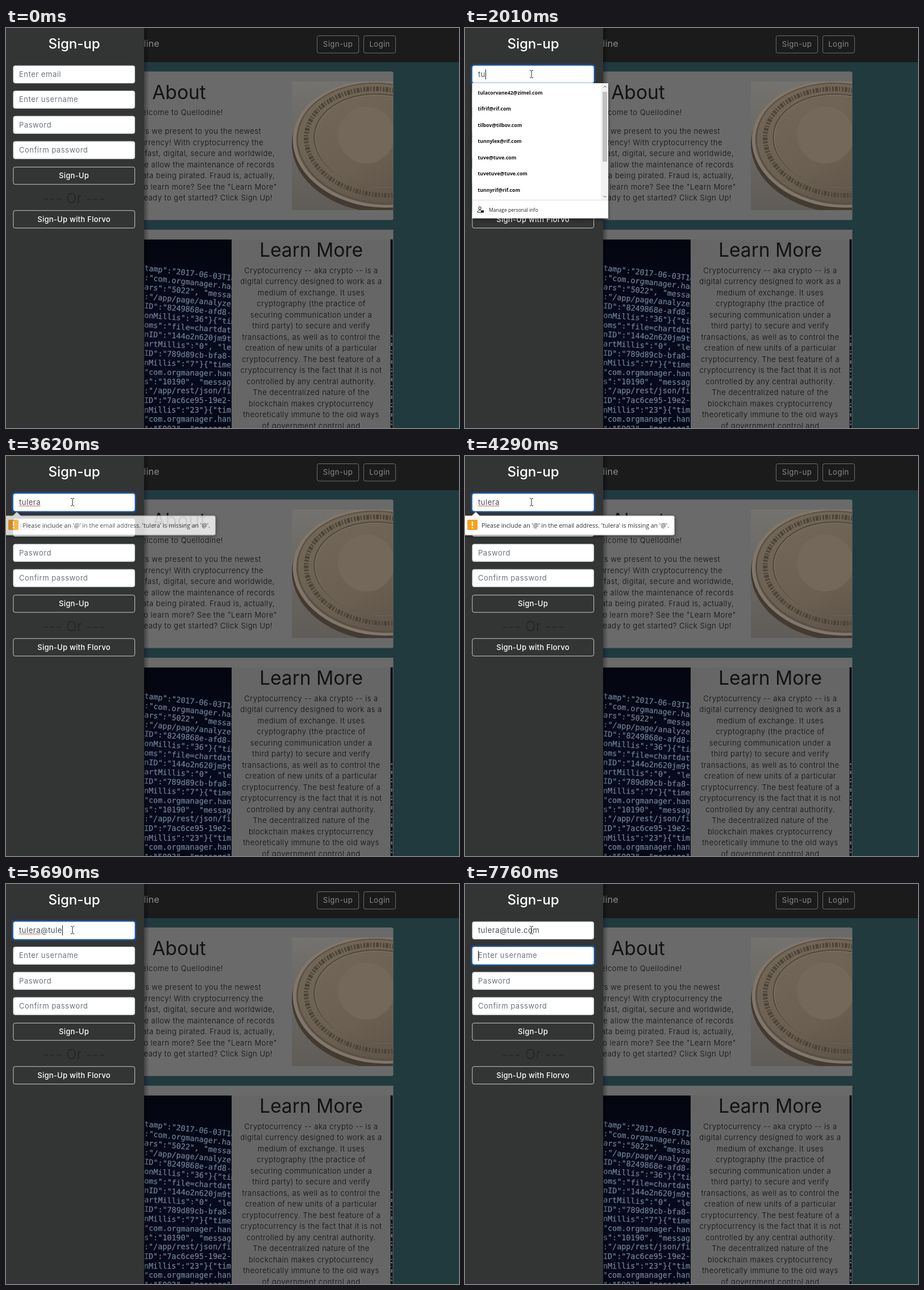
An HTML page that plays this animation: 797x703 px, repeating every 8 s.

```html
<!DOCTYPE html>
<html lang="en">
<head>
<meta charset="utf-8">
<title>Sign-up form</title>
<style>
  html, body { margin: 0; width: 100%; height: 100%; overflow: hidden; background: #203a3e; }
  svg { display: block; width: 100%; height: 100%; }
  text { font: 400 13px Inter, "Open Sans", sans-serif; letter-spacing: .04em; }
  .mid { text-anchor: middle; }
  .end { text-anchor: end; }
  .light { font-weight: 300; fill: #0c0e10; }
  .h1 { font-size: 33.5px; letter-spacing: 0; fill: #111315; }
  .title { font-size: 24px; letter-spacing: 0; font-weight: 500; fill: #fff; }
  .or { font-size: 24px; letter-spacing: .02em; font-weight: 300; fill: #212529; }
  .brand { font-size: 16.25px; letter-spacing: .01em; fill: #8b8b8b; }
  .nav { fill: #8a8a8a; }
  .btn { font-weight: 500; fill: #fff; letter-spacing: .02em; }
  .hint { fill: #6c757d; }
  .typed { fill: #495057; }
  .ui text { font-family: "Open Sans", "Noto Sans", sans-serif; letter-spacing: 0; }
  .ui .tip { font-size: 7.4px; fill: #555; }
  .ui .item { font-size: 8.7px; font-weight: 700; fill: #111; }
  .ui .foot { font-size: 8.5px; fill: #222; }
  .ui .msg { font-size: 10.6px; fill: #333; }
  .code text {
    font: 400 13.4px "DejaVu Sans Mono", "Noto Sans Mono", monospace; letter-spacing: 0;
    fill: #6d8096; stroke: #6d8096; stroke-width: .25;
  }
</style>
</head>
<body>
<svg viewBox="0 0 797 703" preserveAspectRatio="none">
  <defs>
    <clipPath id="coinBox"><rect x="503" y="94" width="178" height="226"/></clipPath>
    <clipPath id="codeBox"><rect x="243" y="371.5" width="154" height="332"/></clipPath>
    <linearGradient id="backdrop" x2="0" y2="1">
      <stop offset="0" stop-color="#74726e"/><stop offset="1" stop-color="#605c57"/>
    </linearGradient>
    <linearGradient id="metal" x2="1" y2="1">
      <stop offset="0" stop-color="#746959"/><stop offset=".55" stop-color="#6a5f51"/><stop offset="1" stop-color="#564c41"/>
    </linearGradient>
    <linearGradient id="navy" x2="0" y2="1">
      <stop offset="0" stop-color="#03050f"/><stop offset=".5" stop-color="#070b1e"/><stop offset="1" stop-color="#050817"/>
    </linearGradient>
    <linearGradient id="edge">
      <stop offset="0" stop-opacity=".35"/><stop offset="1" stop-opacity="0"/>
    </linearGradient>
    <filter id="shadow" x="-10%" y="-10%" width="120%" height="125%">
      <feDropShadow dx="0" dy="2" stdDeviation="3.5" flood-opacity=".45"/>
    </filter>
  </defs>

  <!-- dimmed page -->
  <rect width="797" height="703" fill="#203a3e"/>
  <rect x="243" y="60" width="7" height="643" fill="#253a4b"/>
  <rect width="797" height="60" fill="#1b1b1b"/>
  <text class="brand end" x="270" y="33">Quellodine</text>
  <g fill="none" stroke="#858585" stroke-width=".8">
    <rect x="547.4" y="13.6" width="73.2" height="30.4" rx="3"/>
    <rect x="629.4" y="13.6" width="56" height="30.4" rx="3"/>
  </g>
  <text class="nav mid" x="584" y="33">Sign-up</text>
  <text class="nav mid" x="657.5" y="33">Login</text>

  <rect x="200" y="76.5" width="481.5" height="261" rx="3" fill="#6a6a6a"/>
  <text class="h1 mid" x="304.5" y="124.5">About</text>
  <g id="about"></g>
  <g clip-path="url(#coinBox)">
    <rect x="503" y="94" width="178" height="226" fill="url(#backdrop)"/>
    <g transform="rotate(6 655 207)">
      <ellipse cx="655" cy="211" rx="152" ry="113" fill="#433a31"/>
      <ellipse cx="657" cy="204" rx="153" ry="111" fill="#81766a"/>
      <ellipse cx="659" cy="203" rx="149" ry="107" fill="#5a5045"/>
      <ellipse cx="659" cy="202" rx="146" ry="104" fill="url(#metal)"/>
      <g fill="none">
        <ellipse cx="659" cy="200" rx="132" ry="93" stroke="#4d443a" stroke-width="8" stroke-dasharray="3 2 5 2 2 3"/>
        <ellipse cx="659" cy="198" rx="118" ry="82" stroke="#4a4137" stroke-width="1.5"/>
        <ellipse cx="659" cy="199" rx="116" ry="81" stroke="#7d7163"/>
      </g>
    </g>
    <circle cx="634" cy="188" r="50" fill="#736859"/>
  </g>

  <rect x="200" y="354.5" width="481.5" height="360" fill="#6a6a6a"/>
  <rect x="397" y="371.5" width="279" height="332" fill="#666"/>
  <g class="code" clip-path="url(#codeBox)">
    <rect x="243" y="371.5" width="154" height="332" fill="url(#navy)"/>
    <g id="code"></g>
  </g>
  <rect x="676.5" y="371.5" width="4" height="332" fill="#090b16"/>
  <path d="M678.5 540V703" stroke="#777d88" stroke-width="2" stroke-dasharray="3 5 1 4 6 7 2 3"/>
  <text class="h1 mid" x="537" y="402">Learn More</text>
  <g id="learn"></g>

  <!-- sidebar -->
  <rect x="243" width="9" height="703" fill="url(#edge)"/>
  <rect width="243" height="703" fill="#333534"/>
  <text class="title mid" x="120" y="35.5">Sign-up</text>
  <g id="fields"></g>
  <g fill="none" stroke="#eee" stroke-width=".8">
    <rect x="12.9" y="244.4" width="213.7" height="30.4" rx="3.3"/>
    <rect x="12.9" y="320.8" width="213.7" height="30.8" rx="3.3"/>
  </g>
  <text class="btn mid" x="119.5" y="263.5">Sign-Up</text>
  <text class="or mid" x="120" y="308">--- Or ---</text>
  <text class="btn mid" x="119.5" y="340.5">Sign-Up with Florvo</text>

  <text id="typed" class="typed" x="23" y="86"></text>
  <path id="squiggle" fill="none" stroke="#d8342c"/>
  <rect id="caret" width="1" height="18" fill="#222"/>

  <!-- saved entries -->
  <g id="menu" class="ui">
    <rect id="sheet" x="12.5" y="97" width="239.5" fill="#fff" filter="url(#shadow)"/>
    <text id="tip" class="tip" x="22" y="110.5">Type '/' to search from your saved info</text>
    <g id="list">
      <g id="items"></g>
      <rect x="239" y="115" width="13" height="205" fill="#f1f1f1"/>
      <rect x="242" y="130" width="8" height="123" fill="#c1c1c1"/>
      <path d="M243.5 122.5L246 120L248.5 122.5M243.5 313L246 315.5L248.5 313" fill="none" stroke="#505050"/>
      <path d="M12.5 320.5H252" stroke="#ddd"/>
      <g fill="none" stroke="#111">
        <circle cx="26" cy="334.5" r="2.3"/>
        <path d="M22 342C22 338.5 24 338 28 338M22 342H28"/>
      </g>
      <rect x="28" y="338.5" width="5" height="4" fill="#111"/>
      <text class="foot" x="42" y="340.5">Manage personal info</text>
    </g>
  </g>

  <!-- validation bubble -->
  <g id="bubble" class="ui">
    <path id="bubbleBody" fill="#fff" stroke="#a8a8a8" filter="url(#shadow)"/>
    <rect x="4" y="112" width="18" height="18" rx="1.5" fill="#f5a11d"/>
    <path d="M13 115V123M13 125V127.3" stroke="#fff" stroke-width="2.2"/>
    <text id="msg" class="msg" x="29" y="126"></text>
  </g>

  <path id="arrow" d="M0 0V14.5L3.4 11.4L5.6 16.5L8 15.5L5.8 10.5H10.5Z" fill="#fff" stroke="#000" stroke-width=".8"/>
  <path id="beam" d="M-3 -6.5H-1L0 -5.5L1 -6.5H3M0 -5.5V5.5M-3 6.5H-1L0 5.5L1 6.5H3" fill="none" stroke="#222"/>
</svg>
<script>
const NS = 'http://www.w3.org/2000/svg';
const $ = id => document.getElementById(id);

function add(parent, tag, attrs, text) {
  const el = document.createElementNS(NS, tag);
  for (const k in attrs) el.setAttribute(k, attrs[k]);
  if (text) el.textContent = text;
  return parent.appendChild(el);
}
const set = (id, attrs) => { for (const k in attrs) $(id).setAttribute(k, attrs[k]); };
const show = (id, on) => $(id).setAttribute('visibility', on ? 'visible' : 'hidden');
const clamp = v => Math.max(0, Math.min(1, v));

// Text blocks: right edge and line
[
  [382, 'Welcome to Quellodine!'],
  [449, 'After years we present to you the newest'],
  [453, 'cryptocurrency! With cryptocurrency the'],
  [473, 'future is fast, digital, secure and worldwide,'],
  [473, 'and we allow the maintenance of records'],
  [473, 'without data being pirated. Fraud is, actually,'],
  [477, 'over. Want to learn more? See the "Learn More"'],
  [469, 'section. Ready to get started? Click Sign Up!'],
].forEach(([x, s], i) =>
  add($('about'), 'text', { class: 'light end', x, y: i ? 166.5 + 19.5 * i : 153 }, s));

[
  'Cryptocurrency -- aka crypto -- is a', 'digital currency designed to work as a',
  'medium of exchange. It uses', 'cryptography (the practice of',
  'securing communication under a', 'third party) to secure and verify',
  'transactions, as well as to control the', 'creation of new units of a particular',
  'cryptocurrency. The best feature of a', 'cryptocurrency is the fact that it is not',
  'controlled by any central authority.', 'The decentralized nature of the',
  'blockchain makes cryptocurrency', 'theoretically immune to the old ways',
  'of government control and',
].forEach((s, i) => add($('learn'), 'text', { class: 'light mid', x: 537, y: 430.5 + 19.5 * i }, s));

// Code photo: the tilt flattens towards the bottom
[
  'tamp":"2017-06-03T18', ':"com.orgmanager.hand', 'ars":"5022", "message', ':"/app/page/analyze"',
  'ID":"8249868e-afd8-46', 'onMillis":"36"}{"time', 'oms":"file=chartdata_', 'nID":"144o2n620jm9trnd',
  'artMillis":"0", "level', 'ID":"789d89cb-bfa8-4e', 'nMillis":"7"}{"timest', '"com.orgmanager.handle',
  's":"10190", "message"', ':"/app/rest/json/file"', 'ID":"7ac6ce95-19e2-4a', 'nMillis":"23"}{"times',
  '"com.orgmanager.handle', '":"5003", "message":"',
].forEach((s, i) => {
  const y = 426 + 16.65 * i;
  const tilt = 6.6 * Math.max(0, 1 - i / 13);
  add($('code'), 'text', { x: 243, y, transform: `rotate(${tilt} 243 ${y})` }, s);
});

const fields = ['Enter email', 'Enter username', 'Pasword', 'Confirm password'].map((s, i) => {
  const y = 66.2 + 44.35 * i;
  const ring = add($('fields'), 'rect', { x: 10, y: y - 2.9, width: 219.5, height: 36.5, rx: 5.5, fill: '#1d4a80' });
  const box = add($('fields'), 'rect', { x: 12.9, y, width: 213.7, height: 30.7, rx: 3.3, fill: '#fff', 'stroke-width': .8 });
  const hint = add($('fields'), 'text', { class: 'hint', x: 23, y: y + 19.8 }, s);
  return { ring, box, hint };
});

[
  'tulacorvane42@zimel.com', 'tifrif@rif.com', 'tilbov@tilbov.com', 'tunnylex@rif.com',
  'tuve@tuve.com', 'tuvetuve@tuve.com', 'tunnyrif@rif.com',
].forEach((s, i) => add($('items'), 'text', { class: 'item', x: 22.5, y: 134.8 + 28.45 * i }, s));

// Timeline, in ms
const LOOP = 8000, FOCUS = 675, TAB = 7625, ENTER = 3470, FADE_OUT = 60;
const ADDRESS = 'tulera@tule.com';
const KEYS = [1605, 2005, 2075, 2205, 2535, 2605, 5015, 5355, 5425, 5490, 5565, 6685, 7025, 7295, 7355];
const BUBBLES = [
  { from: ENTER, to: 5015, right: 368.5, msg: "Please include an '@' in the email address. 'tulera' is missing an '@'." },
  { from: 5080, to: 5355, right: 314, msg: "Please enter a part following '@'. 'tulera@' is incomplete." },
];

const typed = $('typed');
typed.textContent = ADDRESS.slice(0, 6);
const wordEnd = 23 + typed.getComputedTextLength();
let wave = 'M23 88.5';
for (let x = 24.5, up = true; x < wordEnd; x += 1.5, up = !up) wave += `L${x} ${up ? 87 : 88.5}`;
set('squiggle', { d: wave });

function drawPointer(t) {
  const p = clamp((t - 60) / 540);
  const e = p < .5 ? 2 * p * p : 1 - 2 * (1 - p) ** 2;
  const x = 757 - 640 * e, y = 697 - 616 * e;
  const overField = x < 227 && y < 97;
  show('arrow', t >= 70 && !overField);
  show('beam', overField);
  set(overField ? 'beam' : 'arrow', { transform: `translate(${x} ${y})` });
}

function drawFocus(t) {
  const left = clamp((t - TAB) / 120);
  const level = [clamp((t - FOCUS) / 120) * (1 - left), left, 0, 0];
  fields.forEach((f, i) => {
    f.ring.setAttribute('opacity', level[i]);
    f.box.setAttribute('stroke', level[i] > .5 ? '#86b7fe' : '#ced4da');
  });
}

function drawTyping(t) {
  const count = KEYS.filter(k => k <= t).length;
  typed.textContent = ADDRESS.slice(0, count);
  fields[0].hint.setAttribute('visibility', count ? 'hidden' : 'visible');
  show('squiggle', t >= ENTER && t < TAB);

  const inName = t >= TAB;
  const since = inName ? TAB : count ? KEYS[count - 1] : FOCUS;
  const width = count && !inName ? typed.getComputedTextLength() : 0;
  show('caret', t >= FOCUS && Math.floor((t - since) / 530) % 2 === 0);
  set('caret', { x: Math.round(23 + width), y: inName ? 117 : 72.5 });
}

function drawMenu(t) {
  const shift = t >= 1745 ? -18 : 0;
  show('menu', t >= 745 && t < 2075);
  $('tip').setAttribute('display', shift ? 'none' : 'inline');
  set('sheet', { height: 255.5 + shift });
  set('list', { transform: `translate(0 ${shift})` });
}

function drawBubble(t) {
  const b = BUBBLES.find(b => t >= b.from && t < b.to + FADE_OUT);
  show('bubble', !!b);
  if (!b) return;
  set('bubble', { opacity: clamp((t - b.from) / 190) * (1 - clamp((t - b.to) / FADE_OUT)) });
  set('bubbleBody', { d: `M-4 105H12L19 98.5L26 105H${b.right - 3}q3 0 3 3V136q0 3 -3 3H-4Z` });
  $('msg').textContent = b.msg;
}

const start = performance.now();
function frame() {
  const t = (performance.now() - start) % LOOP;
  [drawPointer, drawFocus, drawTyping, drawMenu, drawBubble].forEach(draw => draw(t));
  requestAnimationFrame(frame);
}
frame();
</script>
</body>
</html>
```
